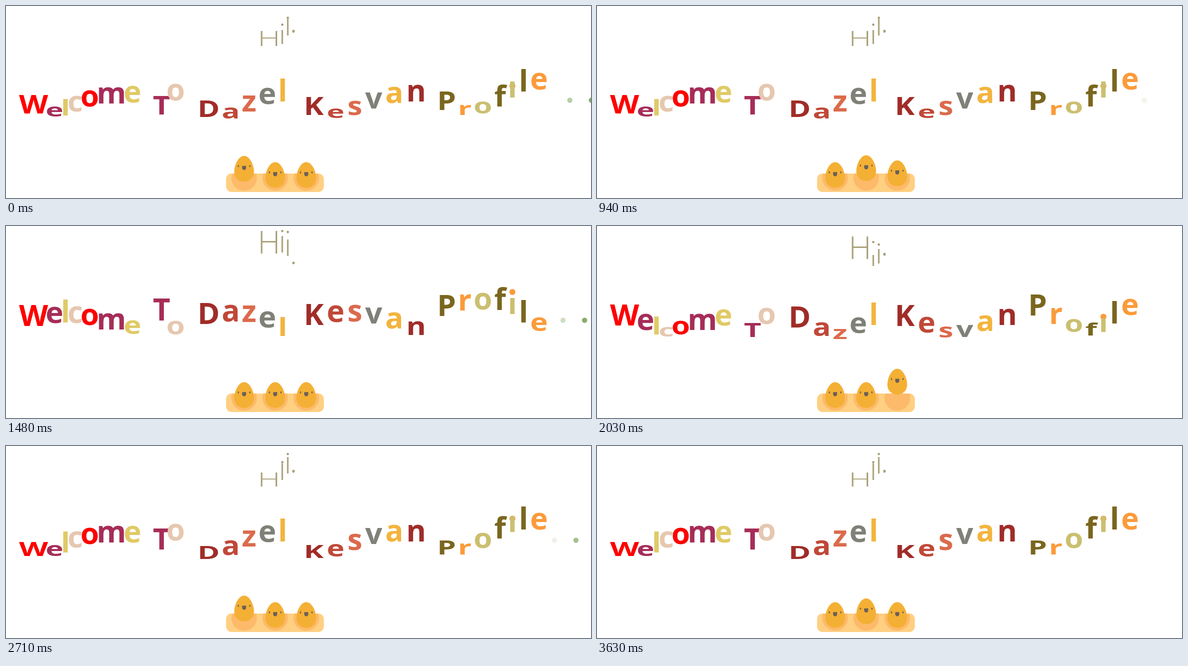
An HTML page for the animation above (3720 ms loop, 1167 by 384 pixels).

```html
<!DOCTYPE html>
<html lang="en">
<head>
<meta charset="utf-8">
<title>Welcome</title>
<style>
  html, body { margin: 0; width: 100%; height: 100%; overflow: hidden; background: #fff; }
  svg { display: block; width: 1167px; height: 384px; }
  text { font: 700 60px "Open Sans", "Noto Sans", sans-serif; text-anchor: middle; }
  .thin text { font-weight: 300; font-size: 63px; }
</style>
</head>
<body>
<svg id="stage" viewBox="0 0 1167 384">
  <defs>
    <clipPath id="tray"><rect x="439" y="335" width="195" height="37" rx="11"/></clipPath>
  </defs>
  <rect x="439" y="335" width="195" height="37" rx="11" fill="#ffcf82"/>
</svg>
<script>
const LOOP = 3720;
const BEAT = LOOP / 48;       // the picture changes in even steps
const WAVE = LOOP / 4;        // one wave through each word
const SPAN = 10;              // wave length, in sevenths of a word
const stage = document.getElementById('stage');

function add(parent, tag, attrs, text) {
  const el = document.createElementNS('http://www.w3.org/2000/svg', tag);
  for (const k in attrs) el.setAttribute(k, attrs[k]);
  if (text) el.textContent = text;
  return parent.appendChild(el);
}

const red = '#fe0000', plum = '#a62d58', sand = '#e0ca66', blush = '#e6c7b0';
const olive = '#7a661e', orange = '#fb9b3a', khaki = '#cbbf70';
const warm = ['#a02c28', '#c04838', '#db6a4c', '#7f8077', '#f3b43e'];

const words = [
  { text: 'Hıı.', left: 502, right: 581, rest: 53, ground: 81, palette: ['#a9a078'], thin: true },
  { text: 'Welcome', left: 26, right: 270, rest: 193, ground: 221, palette: [red, plum, sand, blush] },
  { text: 'To', left: 293, right: 357, rest: 189, ground: 223, palette: [plum, blush] },
  { text: 'Dazel', left: 382, right: 561, rest: 191, ground: 226, palette: warm },
  { text: 'Kesvan', left: 594, right: 838, rest: 191, ground: 224, palette: warm },
  { text: 'Profıle', left: 860, right: 1081, rest: 167, ground: 219,
    palette: [olive, orange, khaki, olive, khaki, olive, orange] }
];

// Letters keep their own widths; the gaps fill the word's box.
function setWord({ text, left, right, rest, ground, palette, thin }) {
  const group = add(stage, 'g', thin ? { class: 'thin' } : {});
  const set = [...text].map((ch, i) => {
    const fill = palette[i % palette.length];
    const dot = ch === 'ı' &&
      add(group, 'circle', thin ? { r: 2.4, fill } : { r: 6, fill: orange });
    const el = add(group, 'text', { fill }, ch);
    return { el, dot, rest, travel: ground - rest, dotY: rest - (thin ? 43 : 37),
      width: el.getComputedTextLength(), lag: 7 * (i + 1) / text.length - 1 };
  });
  const total = set.reduce((sum, l) => sum + l.width, 0);
  const gap = (right - left - total) / (set.length - 1);
  let x = left;
  for (const l of set) {
    l.x = x + l.width / 2;
    x += l.width + gap;
    if (l.dot) l.dot.setAttribute('cx', l.x);
  }
  return set;
}
const letters = words.flatMap(setWord);

function makeEgg(x) {
  add(stage, 'circle', { cx: x, cy: 344, r: 25.5, fill: '#fdba6b', 'clip-path': 'url(#tray)' });
  const g = add(stage, 'g', {});
  add(g, 'path', { fill: '#f4b034',
    d: 'M0 0C11 0 19.7 18 19.7 32C19.7 44 11 51.5 0 51.5S-19.7 44-19.7 32C-19.7 18-11 0 0 0Z' });
  for (const side of [-11.5, 11.5])
    add(g, 'ellipse', { cx: side, cy: 20.5, rx: 1.3, ry: 2.1, fill: '#6b6058' });
  add(g, 'path', { d: 'M-4 20H4V24A4 4.3 0 0 1-4 24Z', fill: '#6b6058' });
  return g;
}

// each egg hops at its own pace
const eggs = [
  { x: 475, top: 110, every: 542 },
  { x: 537, top: 825, every: 1345 },
  { x: 599, top: 790, every: 1240 }
].map(egg => ({ ...egg, el: makeEgg(egg.x) }));

// pairs of dots drift off to the right
const dots = [-650, 940, 2330].flatMap(start => [0, 43].map(gap =>
  ({ start, gap, el: add(stage, 'circle', { cy: 188.5, r: 5.2, fill: '#86ab66' }) })));

// 0 at rest, 1 on the ground
const drop = d => Math.pow((1 + Math.cos(2 * Math.PI * d / SPAN)) / 2, 1.45);

function draw(t) {
  const low = 1.3 + t / WAVE * SPAN;
  for (const { el, dot, x, rest, travel, dotY, lag } of letters) {
    const u = drop(lag - low);
    const squash = 1 - 0.42 * Math.pow(u, 5);
    el.setAttribute('transform', `translate(${x} ${rest + travel * u}) scale(1 ${squash})`);
    if (dot) dot.setAttribute('cy', dotY + travel * drop(lag - low - 0.8));
  }
  for (const { el, x, top, every } of eggs) {
    const d = (t - top) / every;
    const away = (d - Math.round(d)) * every / 150;
    const hop = 27 * Math.max(0, 1 - away * away);
    el.setAttribute('transform', `translate(${x} ${312.3 - hop})`);
  }
  for (const { el, start, gap } of dots) {
    const x = 1093 + 0.115 * (t - start) - gap;
    el.setAttribute('cx', x);
    el.setAttribute('opacity', Math.max(0, Math.min(1, 0.12 + (x - 1092) / 72)));
  }
}

function tick() {
  const t = performance.now() % LOOP;
  draw(Math.floor((t + 20) / BEAT) * BEAT % LOOP);
  requestAnimationFrame(tick);
}
tick();
</script>
</body>
</html>
```
